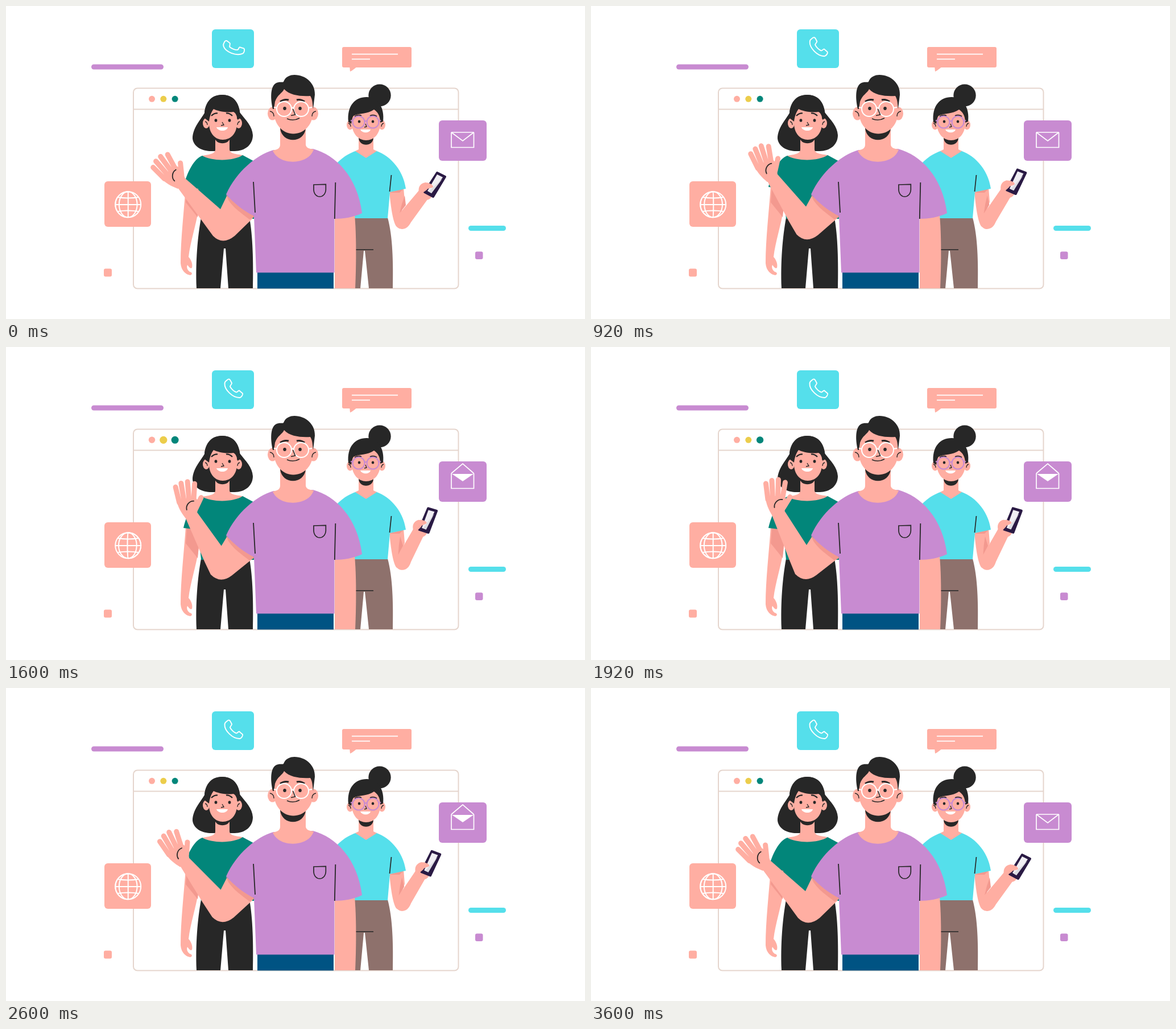
An HTML page with a canvas that plays this animation: 1018 by 550 pixels, repeating every 3640 ms.

```html
<!DOCTYPE html>
<html lang="en">
<head>
<meta charset="utf-8">
<title>Team wave</title>
<style>
html, body { margin: 0; width: 100%; height: 100%; overflow: hidden; background: #fff; }
canvas { display: block; width: 100%; height: 100%; }
</style>
</head>
<body>
<canvas id="stage" width="1018" height="550"></canvas>
<script>
const g = document.getElementById('stage').getContext('2d');
const LOOP = 3640, STEP = 40, TAU = Math.PI * 2;
const SKIN = '#ffaea2', SHADE = '#f3998f', DARK = '#272727', PURPLE = '#c88bd1', TEAL = '#02867a',
  CYAN = '#55dfeb', NAVY = '#005383', BROWN = '#8e716c', BEIGE = '#e5d5cd', WHITE = '#fff', INK = '#2a1a44';

const clamp = x => Math.min(1, Math.max(0, x));
const ease = x => { x = clamp(x); return x * x * (3 - 2 * x); };
const swing = (t, period) => (1 - Math.cos(TAU * t / period)) / 2;

function fill(d, color) {
  g.fillStyle = color;
  g.fill(new Path2D(d));
}
function line(d, color, width) {
  g.strokeStyle = color;
  g.lineWidth = width;
  g.stroke(new Path2D(d));
}
function oval(x, y, rx, ry, color) {
  g.beginPath();
  g.ellipse(x, y, rx, ry, 0, 0, TAU);
  g.fillStyle = color;
  g.fill();
}
function ring(x, y, r, color, width) {
  g.beginPath();
  g.arc(x, y, r, 0, TAU);
  g.strokeStyle = color;
  g.lineWidth = width;
  g.stroke();
}
function box(x, y, w, h, r, color) {
  g.beginPath();
  g.roundRect(x, y, w, h, r);
  g.fillStyle = color;
  g.fill();
}
function turned(x, y, deg, draw) {
  g.save();
  g.translate(x, y);
  g.rotate(deg * Math.PI / 180);
  draw();
  g.restore();
}

function browser(t) {
  g.beginPath();
  g.roundRect(224, 144.5, 571.5, 352, 7);
  g.strokeStyle = BEIGE;
  g.lineWidth = 2;
  g.stroke();
  line('M224 181.5H795', BEIGE, 2);
  [SKIN, '#eccd4b', TEAL].forEach((color, i) => {
    const p = clamp((t - 1000 - 200 * i) / 640);
    const r = 5.5 + 1.2 * Math.sin(Math.PI * p);
    oval(256.5 + 20.3 * i, 163.3, r, r, color);
  });
}

function ornaments() {
  box(150, 102.5, 127, 9, 4.5, PURPLE);
  box(813, 386, 66, 9, 4.5, CYAN);
  box(825, 431.5, 13.5, 13.5, 3, PURPLE);
  box(172, 461.5, 14, 14, 3, SKIN);
  box(591, 72, 122, 36, 3, SKIN);
  fill('M604 106L605 115Q607 115 618 106Z', SKIN);
  line('M608 84.7H689M608 93.4H640', WHITE, 1.7);
}

function callCard(t) {
  box(362, 41, 74, 68, 6, CYAN);
  const p = clamp(t / 1000);
  const tilt = -23 * Math.cos(TAU * t / 640) * (1 - p);
  turned(400, 72.5 - 4.6 * Math.sin(Math.PI * p), tilt, () =>
    line('M-13 -13L-10 -15.5C-7 -17 -6 -15 -3 -9C-3 -7 -6 -5 -6 -3C-4 1 1 6 5 7C7 7 8 4 10 4L16 9' +
      'C17 11 14 16 11 16.5C-2 17 -16 2 -15.5 -8C-15.5 -11 -14.5 -12 -13 -13Z', WHITE, 1.9));
}

function globeCard(t) {
  box(173, 308, 82, 80, 6, SKIN);
  const x = 214.7, y = 348.8, r = 22.5, gap = 45;
  ring(x, y, r, WHITE, 2);
  line('M192 349H237M196 336Q215 339 233 336M196 361Q215 358 233 361', WHITE, 2);
  const shift = 2 * gap * ease(t / 1800) % gap;
  for (let a = -90; a < 90; a += gap) {
    const s = Math.sin((a + shift) * Math.PI / 180);
    g.beginPath();
    g.ellipse(x, y, Math.abs(s) * r, r, 0, -Math.PI / 2, Math.PI / 2, s < 0);
    g.stroke();
  }
}

function mailCard(t) {
  box(761, 201, 84, 71, 6, PURPLE);
  const open = ease((t - 960) / 320) - ease((t - 2680) / 320);
  g.globalAlpha = open;
  fill('M784 223L803 236L822 223Z', WHITE);
  g.globalAlpha = 1;
  line('M783 222V248.5H822.5V222', WHITE, 1.7);
  if (open < 0.5) line('M783 222H822.5', WHITE, 1.7);
  line(`M783 222L803 ${237 - 32 * open}L822.5 222`, WHITE, 1.7);
}

function leftWoman() {
  fill('M349 188C343 199 328 214 328 233C330 249 348 256 364 255H402C420 255 434 244 434 227' +
    'C433 211 422 201 411 187C409 167 396 156 380 156C362 156 350 170 349 188Z', DARK);
  fill('M343 372C337 405 333 450 335 496H377L383 426H386L391 496H434C435 450 434 405 428 372Z', DARK);
  fill('M316 316C313 360 307 410 307 452C308 465 316 472 324 473C328 472 328 468 323 467' +
    'C319 464 317 459 319 455C322 459 324 462 327 460C329 452 324 444 321 441C324 415 334 385 338 360L342 316Z', SKIN);
  fill('M318 318L316 345L337 371L342 318Z', SHADE);
  fill('M345 263C331 268 318 292 312 318L338 321L343 374H436L440 275L416 262Z', TEAL);
  fill('M345 263C357 261 368 260 368 252V228H393V252C394 260 405 260 416 262C400 273 362 273 345 263Z', SKIN);
  fill('M367 230H394C394 245 367 245 367 230Z', DARK);
  oval(352, 206, 6, 9, SKIN);
  oval(409, 206, 6, 9, SKIN);
  fill('M357 178V206C357 224 368 235 381 235C395 235 406 224 406 206V178Z', SKIN);
  fill('M349 197C348 170 360 156 380 156C401 156 412 171 412 197L407 200C406 193 404 188 400 186' +
    'C385 188 371 184 365 181C361 186 358 194 357 203Z', DARK);
  line('M361 193Q366 188 372 188.5M387 188.5Q393 188 398 193', DARK, 2.2);
  oval(369, 201, 2.4, 2.7, DARK);
  oval(393, 201, 2.4, 2.7, DARK);
  line('M380 204L383 209L378 210M350 203Q354 204 354 209M411 203Q407 204 407 209', DARK, 1.3);
  fill('M370 213H390C388 221 373 221 370 213Z', WHITE);
}

function rightWoman(t) {
  fill('M600 372H671C680 405 681 450 680 496H638L631 430H629L623 496H600Z', BROWN);
  line('M600 428.3H646', DARK, 1.6);
  fill('M674 324C676 350 680 378 686 387C692 392 701 388 704 375L696 359L701 344L699 319Z', SKIN);
  fill('M674 328L699 321L692 328Z', SHADE);
  turned(696, 378, -10.4 * swing(t, 3600), () => {
    g.translate(-696, -378);
    fill('M684 376C684 389 691 392 697 392C705 391 708 387 712 380L741 340L727 323L694 362Z', SKIN);
    fill('M701 333L703 350L692 364L696 348Z', SHADE);
    fill('M726 328C724 319 728 311 738 310L754 318L748 336C742 344 733 341 726 335Z', SKIN);
    g.lineJoin = 'round';
    fill('M758 292L773 299L751 336L735 328Z', INK);
    line('M758 293L772 300L751 335L736 327Z', INK, 4);
    fill('M758 296L768 301L748 329L741 325Z', '#f0eef3');
    fill('M767 304L748 329L743 326Z', '#dcdce2');
    fill('M726 325C727 315 735 309 743 311C748 313 751 315 751 318C748 321 742 319 740 323L733 328Z', SKIN);
    g.lineJoin = 'miter';
  });
  fill('M580 278C595 262 608 257 620 253L633 266L646 253C672 260 698 285 703 321L675 327L671 373H600L582 300Z', CYAN);
  line('M677.5 297L674.5 326', DARK, 1.7);
  fill('M620 228H646V252L652 255L633 267L614 255L620 252Z', SKIN);
  fill('M620 231H646C646 248 620 248 620 231Z', DARK);
  oval(657, 157, 19.7, 19.5, DARK);
  oval(605, 209, 6, 8.5, SKIN);
  oval(661, 209, 6, 8.5, SKIN);
  fill('M608 186V208C609 225 620 236 633 236C647 236 657 225 658 208V178Z', SKIN);
  fill('M602 204C599 175 614 160 634 160C655 160 666 180 663 203L658 205C658 192 653 186 647 182' +
    'C636 190 620 188 611 193C608 197 608 203 607 207Z', DARK);
  line('M613 194Q620 190 625 193M640 193Q647 190 652 194', DARK, 2);
  ring(620, 204, 10.5, PURPLE, 2);
  ring(645, 204, 10.5, PURPLE, 2);
  line('M630.5 203Q633 201 635 203M609 202L606 201M655.5 202L659 201', PURPLE, 2);
  oval(621, 203, 2.3, 2.5, DARK);
  oval(645, 203, 2.3, 2.5, DARK);
  line('M632 207L634 212L630 213M602 206Q606 207 606 212M664 206Q660 207 660 212', DARK, 1.3);
  fill('M623 217H641C639 224 626 224 623 217Z', WHITE);
}

function wavingArm(t) {
  const k = swing(t, 1200) / 0.905;
  const at = (x, y, dx, dy) => `${x + dx * k} ${y + dy * k} `;
  fill('M' + at(301, 318, 17, -23) + 'L' + at(345, 378, 5, -1) + 'L' + at(364, 404, -5, -5) +
    'Q' + at(381, 421, -5, -5) + at(402, 404, -6, -3) + 'L' + at(434, 373, -2, 0) +
    'L388 334L' + at(377, 357, 2, -9) + 'L' + at(314, 302, 25, -16) + 'Z', SKIN);
  fill('M387 332L435 366L436 371L428 375C414 364 401 356 391 341Z', SHADE);
  // The hand is drawn upright, then turned about the wrist.
  turned(308 + 21.5 * k, 311 - 19 * k, 38 * (k - 1), () => {
    fill('M-23 -30H11L16 -20L11 -4C8 4 -4 7 -11 4C-17 -6 -22 -16 -23 -30Z', SKIN);
    g.lineCap = 'round';
    line('M-18.5 -24L-22 -52M-10 -26L-11.5 -57.5M-1 -26L0 -59M7 -25L12 -54', SKIN, 9);
    line('M9 -10L20.5 -28.5', SKIN, 9);
    line('M-7 -10C-8 -18 -1 -25 7 -24', DARK, 1.8);
    g.lineCap = 'butt';
  });
}

function man() {
  fill('M578 372L613 367C616 400 616 450 614 496H578Z', SKIN);
  fill('M442 467H576V496.5H442Z', NAVY);
  fill('M470 253C440 262 405 291 387 331C400 346 419 361 436 369L440 468.5H577.5V374' +
    'C593 374 612 371 626 364C618 300 580 262 540 251Z', PURPLE);
  fill('M469 254C478 252 482 250 482 243V212H527V243C527 249 533 251 541 252C532 280 480 281 469 254Z', SKIN);
  fill('M482 210H527V215C524 242 485 242 482 215Z', DARK);
  line('M435 309L438 363M579.3 310L577.8 374', DARK, 1.8);
  line('M541 314L562.3 313.3V323C561 339 542 339 541 323Z', DARK, 1.7);
  oval(468.5, 189, 8.5, 11.5, SKIN);
  oval(540.5, 189, 8.5, 11.5, SKIN);
  fill('M471 145V187C472 210 488 224.5 505 224.5C523 224.5 539 210 540 187V145Z', SKIN);
  fill('M469 181C464 158 466 141 474 136C480 132 486 135 488 133C491 124 500 121 507 121' +
    'C527 121 544 136 543 156L540 181C539 173 539 164 535 158C518 159 499 157 489 146C486 153 477 156 473 168L471 181Z', DARK);
  line('M482 168Q489 163 497 165M511 165Q518 163 525 168', DARK, 3);
  ring(489, 181, 13, WHITE, 2);
  ring(519, 181, 13, WHITE, 2);
  line('M502 180Q504 177 506 180M476 179L471 178M532 179L538 178', WHITE, 2);
  oval(490, 180, 2.8, 3, DARK);
  oval(517, 180, 2.8, 3, DARK);
  line('M504.5 181L508.5 191L501 192.5M494 198Q505 203 516 197', DARK, 1.6);
  line('M464 185Q471 186 471 194M545 185Q538 186 538 194', DARK, 1.4);
}

function draw(t) {
  g.fillStyle = WHITE;
  g.fillRect(0, 0, 1018, 550);
  browser(t);
  ornaments();
  callCard(t);
  globeCard(t);
  mailCard(t);
  leftWoman();
  rightWoman(t);
  wavingArm(t);
  man();
}

const start = performance.now();
function tick() {
  const t = (performance.now() - start) % LOOP;
  draw(Math.floor(t / STEP) * STEP);
  requestAnimationFrame(tick);
}
tick();
</script>
</body>
</html>
```
